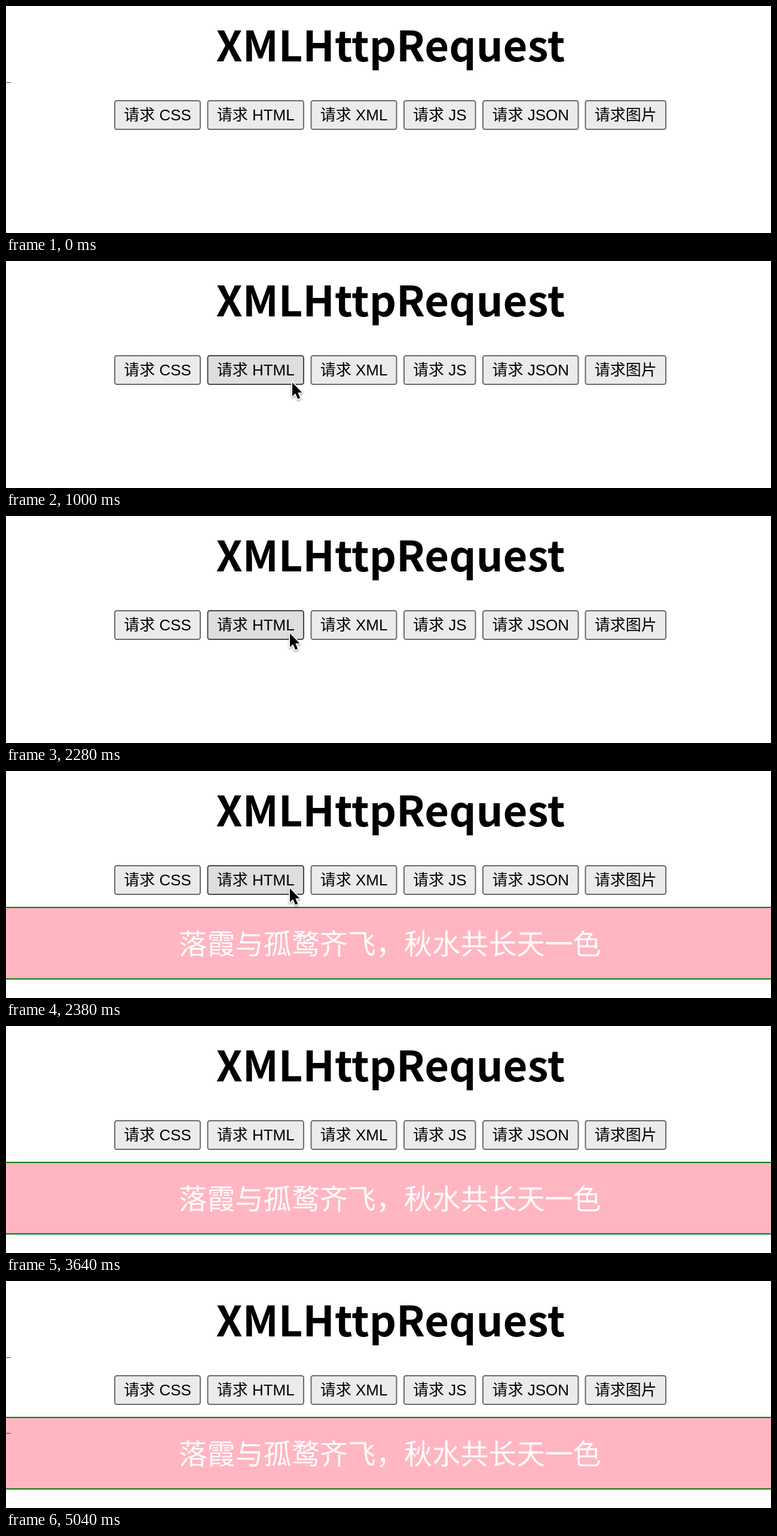
Animation, 1280 px wide and 381 px high, one loop 5100 ms. Source, as an HTML page:

```html
<!DOCTYPE html>
<html lang="zh-CN">
<head>
<meta charset="utf-8">
<style>
  html, body { margin: 0; width: 100%; height: 100%; overflow: hidden; background: #fff; }
  svg { display: block; }
  text { text-anchor: middle; font-family: "Noto Sans CJK SC", "Noto Sans CJK", sans-serif; }
  .title { font-size: 70.5px; font-weight: 700; }
  .button rect { fill: #ebebeb; stroke: #6b6b6b; stroke-width: 2; }
  .button text { font: 26px "Liberation Sans", "Noto Sans CJK SC", "Noto Sans CJK", sans-serif; }
  .button.hover rect { fill: #dedede; stroke: #484848; }
  .button.active rect { fill: #f3f3f3; stroke: #8d8d8d; }
  .verse { font-size: 47.1px; fill: #fff; }
  .tick { fill: #17691b; }
  #cursor { filter: drop-shadow(0 2px 1.5px rgba(0, 0, 0, .35)); }
</style>
</head>
<body>
<svg width="1280" height="381" viewBox="0 0 1280 381">
  <text class="title" x="643.5" y="93">XMLHttpRequest</text>
  <g id="buttons"></g>
  <g id="banner">
    <rect y="228" width="1280" height="122" fill="#077a0b"/>
    <rect y="230" width="1280" height="118" fill="#ffb6c1"/>
    <text class="verse" x="642.5" y="307">落霞与孤鹜齐飞，秋水共长天一色</text>
  </g>
  <rect class="tick" id="upperTick" y="128" width="8" height="1"/>
  <rect class="tick" id="lowerTick" y="255" width="8" height="1"/>
  <path id="cursor" d="M2 3V26L7.2 21.2L11.2 30.6L15.2 28.9L11.2 19.8H18.4Z"
    stroke="#fff" stroke-width="3.4" stroke-linejoin="round" paint-order="stroke"/>
</svg>
<script>
const LOOP = 5100;
const $ = id => document.getElementById(id);

// label, left edge, right edge
const buttons = [
  ['请求 CSS', 181, 326], ['请求 HTML', 336.5, 499], ['请求 XML', 509.5, 654.5],
  ['请求 JS', 665, 786.5], ['请求 JSON', 797, 958.5], ['请求图片', 968.5, 1105]
];
$('buttons').innerHTML = buttons.map(([label, l, r]) => `<g class="button">
  <rect x="${l + 1}" y="159" width="${r - l - 2}" height="48" rx="3.5"/>
  <text x="${(l + r) / 2}" y="192">${label}</text></g>`).join('');
const buttonNodes = [...$('buttons').children];

const easeIn = p => p ** 1.4;
const easeOut = p => 1 - (1 - p) ** 1.6;
const linear = p => p;

// time, x, y, easing towards this point
const path = [
  [160, 504, 381, linear], [600, 485, 232, easeOut],
  [700, 485, 232, linear], [1160, 475, 194, easeOut],
  [1260, 475, 194, linear], [1280, 474, 194, linear],
  [1860, 474, 194, linear], [1880, 473, 194, linear],
  [3060, 473, 194, linear], [3260, 840, -38, easeIn]
];

const upperTicks = [[0, 20], [160, 180], [700, 720], [1680, 1700], [1860, 1880],
  [2400, 2520], [3400, 3420], [3620, 3640], [4080, 4100], [4340, LOOP]];
const lowerTicks = [[4340, 4380], [4520, 4620], [4800, 4940], [5040, LOOP]];

const within = (t, spans) => spans.some(([a, b]) => t >= a && t < b);
const show = (node, on) => node.style.display = on ? '' : 'none';

function cursorAt(t) {
  const i = path.findIndex(key => t < key[0]);
  if (i < 1) return null;
  const [t0, x0, y0] = path[i - 1], [t1, x1, y1, ease] = path[i];
  const p = ease((t - t0) / (t1 - t0));
  return [x0 + (x1 - x0) * p, y0 + (y1 - y0) * p];
}

function draw() {
  const t = performance.now() % LOOP;
  const pos = cursorAt(t);
  show($('cursor'), pos);
  if (pos) $('cursor').setAttribute('transform', `translate(${pos.map(Math.round)})`);

  buttons.forEach(([, l, r], i) => {
    const hover = pos && pos[0] + 1 > l && pos[0] + 1 < r && pos[1] > 158 && pos[1] < 208;
    buttonNodes[i].classList.toggle('hover', !!hover);
    buttonNodes[i].classList.toggle('active', !!hover && t >= 2000 && t < 2280);
  });

  show($('banner'), t >= 2380);
  show($('upperTick'), within(t, upperTicks));
  show($('lowerTick'), within(t, lowerTicks));
  requestAnimationFrame(draw);
}
draw();
</script>
</body>
</html>
```
